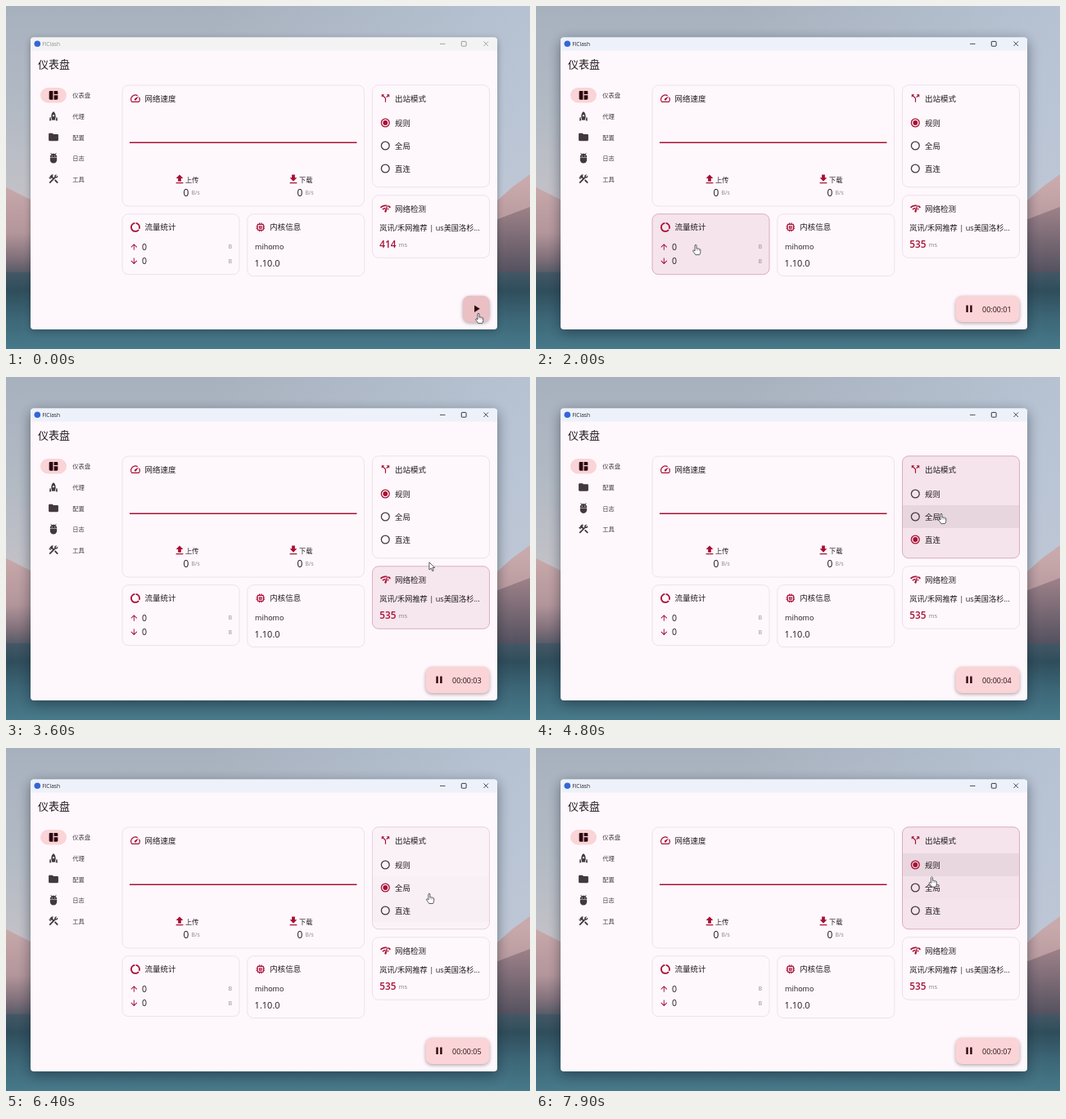
Recreate the animation shown at these times as an HTML page with a canvas. Size 640 px wide and 420 px high, loop 8 s.

```html
<!DOCTYPE html>
<html lang="zh-CN">
<head>
<meta charset="utf-8">
<style>
html, body { margin: 0; width: 100%; height: 100%; overflow: hidden; }
canvas { display: block; width: 640px; height: 420px; }
</style>
</head>
<body>
<canvas id="stage"></canvas>
<script>
const W = 640, H = 420, LOOP = 8000;
const canvas = document.getElementById('stage');
const g = canvas.getContext('2d');
const dpr = window.devicePixelRatio || 1;
canvas.width = W * dpr;
canvas.height = H * dpr;

const RED = '#a80f34', INK = '#211a1d', NAV = '#43383c', GREY = '#8b8187';
const SURFACE = [254, 248, 253], HOVER = [245, 228, 236];
const EDGE = [232, 223, 231], EDGE_HOVER = [217, 163, 183];
const FONT = '"Open Sans", "Noto Sans", "Noto Sans CJK SC", "Noto Sans CJK", sans-serif';

// Icons on a 24 unit grid
const ICONS = {
  rocket: 'M12 2.5s4.5 2.04 4.5 10.5c0 2.49-1.04 5.57-1.6 7H9.1c-.56-1.43-1.6-4.51-1.6-7C7.5 4.54 12 2.5 12 2.5zm2 8.5c0-1.1-.9-2-2-2s-2 .9-2 2 .9 2 2 2 2-.9 2-2zm-6.31 9.52c-.48-1.23-1.52-4.17-1.67-6.87l-1.13.75c-.56.38-.89 1-.89 1.67V22l3.69-1.48zM20 22v-5.93c0-.67-.33-1.29-.89-1.66l-1.13-.75c-.15 2.69-1.2 5.64-1.67 6.87L20 22z',
  board: 'M11 21H5c-1.1 0-2-.9-2-2V5c0-1.1.9-2 2-2h6v18zm2 0h6c1.1 0 2-.9 2-2v-7h-8v9zm8-11V5c0-1.1-.9-2-2-2h-6v7h8z',
  folder: 'M10 4H4c-1.1 0-2 .9-2 2v12c0 1.1.9 2 2 2h16c1.1 0 2-.9 2-2V8c0-1.1-.9-2-2-2h-8l-2-2z',
  bug: 'M5 16c0 3.87 3.13 7 7 7s7-3.13 7-7v-4H5v4zM16.12 4.37l2.1-2.1-.82-.83-2.3 2.31C14.16 3.28 13.12 3 12 3s-2.16.28-3.09.75L6.6 1.44l-.82.83 2.1 2.1C6.14 5.64 5 7.68 5 10v1h14v-1c0-2.32-1.14-4.36-2.88-5.63zM9 9c-.55 0-1-.45-1-1s.45-1 1-1 1 .45 1 1-.45 1-1 1zm6 0c-.55 0-1-.45-1-1s.45-1 1-1 1 .45 1 1-.45 1-1 1z',
  tools: 'M13.78 15.3l6 6 2.11-2.16-6-6zM17.5 10.1c-.39 0-.81-.05-1.14-.19L4.97 21.25l-2.11-2.11 7.41-7.4L8.5 9.96l-.72.7-1.45-1.41v2.86l-.7.7L2.11 9.25l.7-.7h2.81l-1.4-1.41 3.56-3.56c1.17-1.17 3.05-1.17 4.22 0L9.89 5.74l1.41 1.4-.71.71 1.79 1.78 1.82-1.88C14.06 7.42 14 7 14 6.63c0-1.97 1.56-3.52 3.5-3.52.59 0 1.11.14 1.58.42L16.41 6.2l1.5 1.5 2.67-2.67c.28.47.42.97.42 1.6 0 1.92-1.55 3.47-3.5 3.47z',
  speed: 'M20.38 8.57l-1.23 1.85a8 8 0 0 1-.22 7.58H5.07A8 8 0 0 1 15.58 6.85l1.85-1.23A10 10 0 0 0 3.35 19a2 2 0 0 0 1.72 1h13.85a2 2 0 0 0 1.74-1 10 10 0 0 0-.27-10.44zm-9.79 6.84a2 2 0 0 0 2.83 0l5.66-8.49-8.49 5.66a2 2 0 0 0 0 2.83z',
  split: 'M14 4l2.29 2.29-2.88 2.88 1.42 1.42 2.88-2.88L20 10V4zm-4 0H4v6l2.29-2.29 4.71 4.7V20h2v-8.41l-5.29-5.3z',
  donut: 'M13 2.05v3.03c3.39.49 6 3.39 6 6.92 0 .9-.18 1.75-.48 2.54l2.6 1.53c.56-1.24.88-2.62.88-4.07 0-5.18-3.95-9.45-9-9.95zM12 19c-3.87 0-7-3.13-7-7 0-3.53 2.61-6.43 6-6.92V2.05c-5.06.5-9 4.76-9 9.95 0 5.52 4.47 10 9.99 10 3.31 0 6.24-1.61 8.06-4.09l-2.6-1.53C16.17 17.98 14.21 19 12 19z',
  chip: 'M15 9H9v6h6V9zm-2 4h-2v-2h2v2zm8-2V9h-2V7c0-1.1-.9-2-2-2h-2V3h-2v2h-2V3H9v2H7c-1.1 0-2 .9-2 2v2H3v2h2v2H3v2h2v2c0 1.1.9 2 2 2h2v2h2v-2h2v2h2v-2h2c1.1 0 2-.9 2-2v-2h2v-2h-2v-2h2zm-4 6H7V7h10v10z',
  gauge: 'M15.9 5c-.17 0-.32.09-.41.23l-.07.15-5.18 11.65c-.16.29-.26.61-.26.96 0 1.11.9 2.01 2.01 2.01.96 0 1.77-.68 1.96-1.59l.01-.03L16.4 5.5c0-.28-.22-.5-.5-.5zM1 9l2 2c2.88-2.88 6.79-4.08 10.53-3.62l1.19-2.68C9.89 3.84 4.74 5.27 1 9zm20 2l2-2c-1.64-1.64-3.55-2.82-5.59-3.57l-.53 2.82c1.5.62 2.9 1.53 4.12 2.75zm-4 4l2-2c-.8-.8-1.7-1.42-2.66-1.89l-.55 2.92c.42.27.83.59 1.21.97zM5 13l2 2c1.13-1.13 2.56-1.79 4.03-2l1.28-2.88c-2.63-.08-5.3.87-7.31 2.88z',
  upload: 'M5 20h14v-2H5v2zm0-10h4v6h6v-6h4l-7-7-7 7z',
  download: 'M19 9h-4V3H9v6H5l7 7 7-7zM5 18v2h14v-2H5z',
  up: 'M4 12l1.41 1.41L11 7.83V20h2V7.83l5.58 5.59L20 12l-8-8-8 8z',
  down: 'M20 12l-1.41-1.41L13 16.17V4h-2v12.17l-5.58-5.59L4 12l8 8 8-8z',
  play: 'M8 5v14l11-7z',
  pause: 'M6 19h4V5H6v14zm8-14v14h4V5h-4z'
};
for (const name in ICONS) ICONS[name] = new Path2D(ICONS[name]);

const ARROW = new Path2D('M0 0V9.2L2.3 7.2L3.9 10.8L5.4 10.1L3.9 6.7H6.9Z');
const HAND = new Path2D('M-1 1Q0 -.8 1 1V5Q2 4.3 2.8 5.2Q3.8 4.6 4.4 5.6Q5.6 5.3 5.8 6.6V9.4Q5.7 11 4.6 12.6H-.2Q-1.2 10.7-3.2 8.4Q-3.6 6.8-2.2 7L-1 8Z');

const CARDS = {
  speed: [142, 97, 295.5, 148],
  mode: [447.5, 96.8, 143, 125],
  check: [447.5, 231.8, 143, 76.5],
  traffic: [142, 254.7, 143, 74],
  core: [294.8, 254.7, 143, 76]
};

// Pointer stops: time, x, y
const PATH = [
  [500, 577, 376], [700, 460, 384], [900, 319.5, 371], [1300, 222, 342],
  [1650, 190, 302], [2000, 195, 292], [2200, 206, 297], [2600, 330, 305],
  [3100, 474, 288], [3400, 511, 258], [3590, 517, 231], [3600, 517, 227],
  [3750, 501, 208], [3900, 488, 196], [4150, 488, 196], [4600, 495, 167],
  [5000, 495, 167], [5600, 501, 176], [5900, 515, 208], [6100, 524, 228],
  [6250, 524, 228], [6340, 523, 223], [6400, 517, 178], [6650, 490, 148],
  [7000, 480, 138], [7400, 480, 138], [7900, 483.5, 157.5]
];

const clamp = v => Math.max(0, Math.min(1, v));
const ease = v => 1 - (1 - clamp(v)) ** 2;
const mix = (a, b, k) => `rgb(${a.map((v, i) => Math.round(v + (b[i] - v) * k))})`;

function pointer(t) {
  let a = PATH[0];
  if (t <= a[0]) return [a[1], a[2]];
  for (const b of PATH) {
    if (t <= b[0]) {
      const k = (t - a[0]) / (b[0] - a[0]);
      return [a[1] + (b[1] - a[1]) * k, a[2] + (b[2] - a[2]) * k];
    }
    a = b;
  }
  return [a[1], a[2]];
}

const inside = ([px, py], [x, y, w, h]) => px >= x && px <= x + w && py >= y && py <= y + h;

// Share of the last 200 ms the pointer spent in a box
function hover(t, box) {
  let n = 0;
  for (let i = 0; i < 20; i++) n += inside(pointer(t - i * 10), box);
  return n / 20;
}

function text(s, x, y, size, color = INK, weight = 400, align = 'left') {
  g.font = `${weight} ${size}px ${FONT}`;
  g.textAlign = align;
  g.fillStyle = color;
  g.fillText(s, x, y + size * 0.37);
}

function icon(name, x, y, size, color = RED) {
  g.save();
  g.translate(x - size / 2, y - size / 2);
  g.scale(size / 24, size / 24);
  g.fillStyle = color;
  g.fill(ICONS[name], 'evenodd');
  g.restore();
}

function box(x, y, w, h, r, fill, stroke) {
  g.beginPath();
  g.roundRect(x, y, w, h, r);
  if (fill) { g.fillStyle = fill; g.fill(); }
  if (stroke) { g.strokeStyle = stroke; g.lineWidth = 0.9; g.stroke(); }
}

function shadow(blur, y, color) {
  g.shadowBlur = blur * dpr;
  g.shadowOffsetY = y * dpr;
  g.shadowColor = color;
}

function lines(color, width, ...paths) {
  g.strokeStyle = color;
  g.lineWidth = width;
  g.beginPath();
  for (const [x1, y1, x2, y2] of paths) { g.moveTo(x1, y1); g.lineTo(x2, y2); }
  g.stroke();
}

function gradient(x1, y1, x2, y2, ...stops) {
  const f = g.createLinearGradient(x1, y1, x2, y2);
  stops.forEach(([p, c]) => f.addColorStop(p, c));
  return f;
}

function land(fill, ...pts) {
  g.fillStyle = fill;
  g.beginPath();
  pts.forEach(([x, y]) => g.lineTo(x, y));
  g.fill();
}

function wallpaper() {
  g.fillStyle = gradient(0, 0, 0, 260, [0, '#a7b1be'], [0.5, '#b2bac4'], [1, '#c7c3c8']);
  g.fillRect(0, 0, W, 330);
  g.fillStyle = gradient(250, 0, W, 60, [0, 'rgba(188,200,218,0)'], [1, 'rgba(188,200,218,.75)']);
  g.fillRect(0, 0, W, 330);
  const rock = gradient(0, 215, 0, 330, [0, '#c9aaac'], [0.55, '#b3969b'], [0.8, '#84727c'], [1, '#4f5763']);
  land(rock, [0, 222], [32, 238], [32, 330], [0, 330]);
  land(rock, [598, 240], [618, 222], [640, 206], [640, 330], [598, 330]);
  land(gradient(0, 250, 0, 330, [0, '#9a7f87'], [1, '#514f5d']), [598, 262], [640, 246], [640, 330], [598, 330]);
  g.fillStyle = gradient(0, 324, 0, H, [0, '#465866'], [0.25, '#2f4d5b'], [0.6, '#3c6676'], [1, '#47798a']);
  g.fillRect(0, 326, W, H - 326);
}

function frame(active) {
  g.save();
  shadow(active ? 16 : 9, active ? 4 : 2, `rgba(20,30,45,${active ? 0.5 : 0.35})`);
  box(30, 38.5, 570, 357.5, 4, mix(SURFACE, SURFACE, 0));
  g.restore();
  box(30, 38.5, 570, 16, [4, 4, 0, 0], active ? '#edf2fa' : '#f3f3f4');
  g.fillStyle = '#3565d8';
  g.beginPath();
  g.arc(38.3, 46.3, 3.8, 0, 7);
  g.fill();
  const ink = active ? '#242428' : '#929296';
  text('FlClash', 44.3, 46.6, 6.6, ink);
  lines(ink, 0.8, [530, 46.4, 536.5, 46.4], [583.4, 43.4, 589, 49], [589, 43.4, 583.4, 49]);
  box(556.3, 43.4, 5.8, 5.8, 0.8, null, ink);
  text('仪表盘', 39, 71.3, 13);
}

function nav(direct) {
  box(42, 100, 32, 18.5, 9.2, '#fad4d6');
  const items = [['board', '仪表盘'], ['rocket', '代理'], ['folder', '配置'], ['bug', '日志'], ['tools', '工具']]
    .filter(([name]) => !(direct && name === 'rocket'));
  items.forEach(([name, label], i) => {
    const y = 109.3 + i * 25.6;
    icon(name, 58, y, 14.2, i ? NAV : '#2c0a12');
    text(label, 81.3, y + 0.3, 7.3, NAV);
  });
}

function card(t, name, iconName, title) {
  const [x, y, w, h] = CARDS[name], k = hover(t, CARDS[name]);
  box(x, y, w, h, 7.5, mix(SURFACE, HOVER, k), mix(EDGE, EDGE_HOVER, k));
  icon(iconName, x + 16, y + 16.2, 14.2);
  text(title, x + 27.5, y + 16.2, 9.5);
}

function speedCard(t) {
  card(t, 'speed', 'speed', '网络速度');
  lines(RED, 1.4, [151, 167.3, 428.5, 167.3]);
  for (const [x, name, label] of [[212, 'upload', '上传'], [351, 'download', '下载']]) {
    icon(name, x, 212.2, 15);
    text(label, x + 7, 213, 8.2);
    text('0', x + 4.6, 229, 12, INK, 500);
    text('B/s', x + 14.5, 228.6, 6.8, GREY);
  }
}

function modeCard(t) {
  card(t, 'mode', 'split', '出站模式');
  const picks = [[0, 0], [4200, 2], [5000, 1], [7300, 0]];
  const [since, chosen] = picks.filter(([at]) => t >= at).pop();
  ['规则', '全局', '直连'].forEach((label, i) => {
    const y = 143 + i * 28, on = i === chosen;
    const k = hover(t, [447.5, y - 14, 143, 28]);
    if (k) {
      g.fillStyle = `rgba(60,30,45,${0.07 * k})`;
      g.fillRect(448, y - 14, 142, 28);
    }
    g.strokeStyle = g.fillStyle = on ? RED : NAV;
    g.lineWidth = 1.3;
    g.beginPath();
    g.arc(463.3, y, 4.9, 0, 7);
    g.stroke();
    if (on) {
      g.beginPath();
      g.arc(463.3, y, 2.9 * (since ? ease((t - since) / 150) : 1), 0, 7);
      g.fill();
    }
    text(label, 475, y + 0.2, 9.4);
  });
}

function checkCard(t) {
  card(t, 'check', 'gauge', '网络检测');
  text('岚讯/禾网推荐 | us美国洛杉...', 456.3, 271.7, 9.2);
  if (t >= 500 && t < 1600) {
    const p = ((t - 500) % 1333) / 1333;
    const head = ease(p * 2) * 4.71, tail = ease(p * 2 - 1) * 4.71;
    const turn = -0.3 + (t - 900) / 2200 * Math.PI * 2;
    g.strokeStyle = RED;
    g.lineWidth = 2.2;
    g.beginPath();
    g.arc(464.8, 291.8, 8.2, turn + tail, turn + Math.max(head, tail + 0.05));
    g.stroke();
  } else {
    text(t < 500 ? '414' : '535', 456.3, 292, 11.8, RED, 600);
    text('ms', 479.5, 292, 7.6, GREY);
  }
}

function smallCards(t) {
  card(t, 'traffic', 'donut', '流量统计');
  [['up', 295], ['down', 312.3]].forEach(([name, y]) => {
    icon(name, 156.3, y, 11.5);
    text('0', 166, y, 10.5, INK, 500);
    text('B', 276, y, 6.5, GREY, 400, 'right');
  });
  card(t, 'core', 'chip', '内核信息');
  text('mihomo', 304, 295, 9, INK, 500);
  text('1.10.0', 303.6, 314.7, 11, INK, 500);
}

function startButton(t) {
  const open = ease((t - 100) / 200), w = 32.5 + 45.5 * open, x = 590.5 - w;
  const k = t < 500 ? 1 : hover(t, [512, 355, 79, 32]);
  g.save();
  shadow(4, 1.6, 'rgba(50,20,30,.38)');
  box(x, 354.7, w, 32.3, 8, mix([250, 212, 214], [234, 192, 197], k));
  g.restore();
  icon(t < 150 ? 'play' : 'pause', x + 16.5, 370.7, 14.5, '#2c0a12');
  if (open > 0) {
    const sec = Math.max(0, Math.floor((t - 500) / 1000));
    g.save();
    g.beginPath();
    g.rect(x, 354, w - 6, 34);
    g.clip();
    text('00:00:0' + sec, x + 32.5, 371.3, 9, '#2c0a12', 500);
    g.restore();
  }
}

function cursor(t) {
  const p = pointer(t);
  const link = t < 540 || Object.values(CARDS).some(c => inside(p, c));
  const shape = link ? HAND : ARROW;
  g.save();
  g.translate(...p);
  g.lineJoin = 'round';
  g.lineWidth = 0.8;
  g.fillStyle = '#fff';
  g.strokeStyle = '#37343a';
  g.fill(shape);
  g.stroke(shape);
  if (link) lines('#77737a', 0.5, [1, 5, 1, 7.5], [2.8, 5.5, 2.8, 7.7], [4.4, 6, 4.4, 7.8]);
  g.restore();
}

function draw(t) {
  g.setTransform(dpr, 0, 0, dpr, 0, 0);
  wallpaper();
  frame(t >= 500);
  nav(t >= 4200 && t < 5000);
  speedCard(t);
  modeCard(t);
  smallCards(t);
  checkCard(t);
  startButton(t);
  cursor(t);
}

const began = performance.now();
function tick() {
  draw((performance.now() - began) % LOOP);
  requestAnimationFrame(tick);
}
tick();
</script>
</body>
</html>
```
